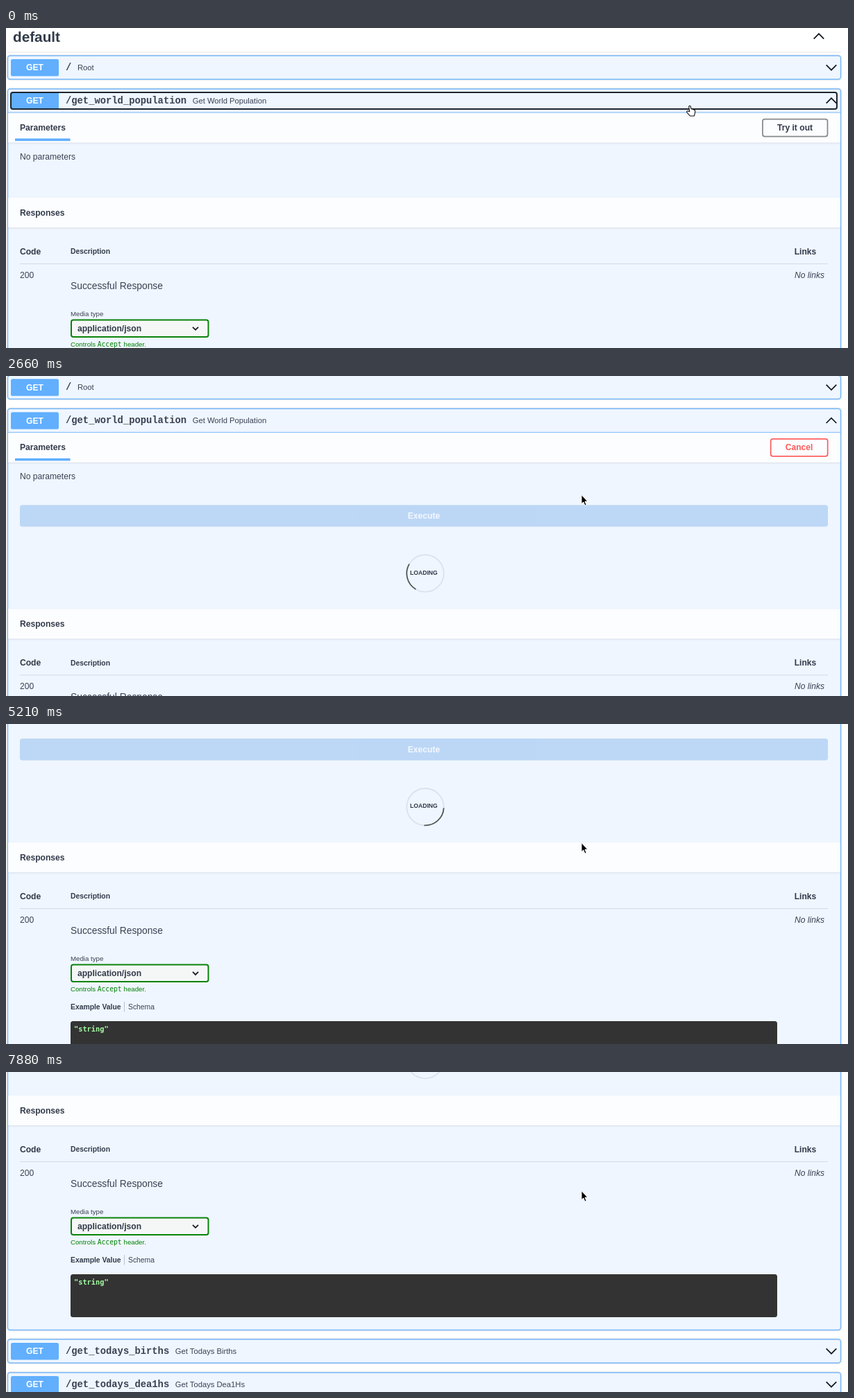
Recreate the animation shown at these times as an HTML page. Size 1213 px wide and 462 px high, loop 8000 ms.

```html
<!DOCTYPE html>
<html lang="en">
<head>
<meta charset="utf-8">
<title>API docs</title>
<style>
html, body { margin: 0; width: 100%; height: 100%; overflow: hidden; background: #fff; }
svg { display: block; }
text { font-family: "Liberation Sans", Arial, sans-serif; font-size: 12.1px; fill: #3b4151; white-space: pre; }
.b { font-weight: 700; fill: #323a49; }
.i { font-style: italic; }
.code { font: 700 13.82px "Liberation Mono", "Courier New", monospace; }
.mono { font-family: "DejaVu Sans Mono", monospace; }
.block { fill: #eff6ff; stroke: #79b9fb; stroke-width: 1.4; filter: drop-shadow(0 0 1.3px rgba(0,0,0,.19)); }
.strip { fill: #fcfdff; filter: drop-shadow(0 1px 1px rgba(0,0,0,.1)); }
.chev { fill: none; stroke: #14181f; stroke-width: 1.7; }
.btn { fill: #fcfdff; stroke-width: 1.75; }
.hover { filter: drop-shadow(0 0 2.5px rgba(0,0,0,.3)); }
</style>
</head>
<body>
<svg id="stage" width="1213" height="462" viewBox="0 0 1213 462"></svg>
<script>
const LOOP = 8000, STEP = 148.6, LAG = 13;

// Page builders
const text = (x, y, s, cls = '', size = 12.1, fill = '') =>
  `<text x="${x}" y="${y}" class="${cls}" style="font-size:${size}px${fill && ';fill:' + fill}">${s}</text>`;
const rect = (x, y, w, h, r, attrs) =>
  `<rect x="${x}" y="${y}" width="${w}" height="${h}" rx="${r}" ${attrs}/>`;
const chevron = (x, y, dir, w = 7.3, h = 3.7, sw = 1.7) =>
  `<path class="chev" style="stroke-width:${sw}" d="M${x - w} ${y - h * dir}L${x} ${y + h * dir}L${x + w} ${y - h * dir}"/>`;
const line = (x1, x2, y, color) =>
  `<path d="M${x1} ${y}H${x2}" stroke="${color}" stroke-width="1"/>`;
const strip = (y, label) =>
  rect(3, y, 1199, 43, 0, 'class="strip"') + text(20, y + 25.6, label, 'b');

function summary(y, path, label, dir) {
  const labelX = 86 + path.length * 8.29 + 8.6;
  return rect(7, y - 12, 69, 24.5, 2.6, 'fill="#61affe"') +
    text(29, y + 4.3, 'GET', 'b', 12.1, '#fff') +
    text(86, y + 4, path, 'code', 13.82) +
    text(labelX, y + 4, label, '', 11.23) +
    chevron(1189, y, dir);
}
const closedRow = (y, path, label) =>
  rect(2.5, y - 17, 1200, 34, 3.5, 'class="block"') + summary(y, path, label, 1);

const head =
  text(10, 20, 'default', 'b', 20.74) + chevron(1171, 12, -1) +
  line(2, 1203, 35, '#e2e4e8') +
  closedRow(57, '/', 'Root');

const operation =
  rect(2.5, 88, 1200, 495.5, 3.5, 'id="block" class="block"') +
  strip(122.5, 'Parameters') +
  line(3, 1202, 122, '#79b9fb') +
  summary(105, '/get_world_population', 'Get World Population', -1) +
  rect(7, 93, 1190, 24, 3, 'id="focus" fill="none" stroke="#1c2530" stroke-width="2"') +
  rect(13, 159.5, 79.5, 3.6, 0, 'fill="#61affe"') +
  text(20, 189.7, 'No parameters') +
  '<g id="try">' + rect(1090, 131.5, 93.5, 25, 3, 'class="btn" stroke="#87898d"') +
  text(1111, 148, 'Try it out', 'b') + '</g>' +
  '<g id="cancel">' + rect(1101.7, 131.5, 82, 25, 3, 'class="btn" stroke="#ff6060"') +
  text(1122.7, 148, 'Cancel', 'b', 12.1, '#ff5a5a') + '</g>' +
  '<g id="execute">' + rect(20, 227, 1164, 31.3, 3.5, 'fill="#4990e2"') +
  text(578.8, 247, 'Execute', 'b', 12.1, '#fff') + '</g>' +
  `<g id="loading" fill="none" stroke-width="1.8">
    <circle cx="604" cy="325.6" r="26.7" stroke="rgba(85,85,85,.12)"/>
    <path id="arc" d="M-18.9 -18.9A26.7 26.7 0 0 1 18.9 -18.9" stroke="rgba(0,0,0,.62)"/>` +
  text(582, 327.4, 'LOADING', 'b', 8.64) + '</g>';

const lower =
  strip(245, 'Responses') +
  text(20, 327, 'Code', 'b') + text(93, 326.3, 'Description', 'b', 10.37) +
  text(1135.7, 327, 'Links', 'b') + line(20, 1184, 340.5, '#d3dae5') +
  text(20, 361, '200') + text(93, 376.5, 'Successful Response', '', 13.83) +
  text(1136, 361, 'No links', 'i') +
  text(93, 416, 'Media type', '', 9.68) +
  rect(94, 421.5, 197.5, 24.5, 3, 'fill="#f5f7f6" stroke="#0a830a" stroke-width="2"') +
  text(103, 437.7, 'application/json', 'b') + chevron(273, 433.8, 1, 4, 2, 1.8) +
  text(93, 459.5, 'Controls', '', 9.68, '#008000') +
  text(131.7, 459.5, 'Accept', 'mono', 9.68, '#008000') +
  text(169.5, 459.5, 'header.', '', 9.68, '#008000') +
  text(93, 486, 'Example Value', 'b', 10.37) +
  '<path d="M170.5 475V489.5" stroke="#bcc2cc"/>' +
  text(176, 486, 'Schema', '', 10.37) +
  rect(93, 503, 1018, 62, 3.5, 'fill="#333"') +
  text(98, 518.3, '"string"', 'b mono', 10.3, '#a2fca2') +
  closedRow(614, '/get_todays_births', 'Get Todays Births') +
  closedRow(662, '/get_todays_dea1hs', 'Get Todays Dea1Hs');

const cursors =
  `<g id="cursor" stroke-linejoin="round">
    <path id="hand" fill="#fff" stroke="#111" stroke-width="1.1"
      d="M-1.3 1.4Q-.4 -.6 1.1 1L2.2 5Q3.6 4.2 4.3 5.5Q5.8 5 6.2 6.4Q7.8 6.2 7.8 8L7.4 11.4L6.3 15H.4L-4 9.8Q-5 7.8 -2.9 7.7L-.2 8.8Z"/>
    <path id="arrow" fill="#000" stroke="#fff" stroke-width="1"
      d="M0 0V13L2.9 10.4L5 15.6L7.2 14.7L5.1 9.6H9Z"/>
    <g id="ban" fill="#eef0f2" stroke="#85898e" stroke-width="1.5">
      <circle cx="8.7" cy="19.5" r="7.6" fill="#fff" stroke="none"/>
      <circle cx="8.7" cy="19.5" r="6.3"/><path d="M4.3 15.1L13.1 23.9"/>
    </g>
  </g>`;

document.getElementById('stage').innerHTML =
  `<g id="page">${head}${operation}<g id="lower">${lower}</g></g>${cursors}`;

const el = {};
document.querySelectorAll('[id]').forEach(n => el[n.id] = n);

// Keys are [step, ...values]
const scrollKeys = [[14, 0], [22, 108.5], [29, 171], [40, 235], [45, 264], [53, 343]];
const cursorKeys = [
  [0, 985, 112, 'hand'], [1, 1022, 129, 'arrow'], [2, 1078, 150, 'arrow'],
  [3, 1116, 153, 'hand'], [4, 1128, 147, 'hand'], [6, 1128, 147, 'hand'],
  [7, 1110, 156, 'arrow'], [8, 1040, 184, 'arrow'], [9, 945, 218, 'arrow'],
  [10, 880, 237, 'hand'], [11, 847, 244, 'hand'], [12, 843.5, 244.5, 'hand'],
  [13, 843.5, 244.5, 'ban'], [14, 837, 212, 'arrow'], [15, 831, 181, 'arrow'],
  [16, 829, 171.5, 'arrow']
];

function at(keys, k) {
  let i = keys.length - 1;
  while (i > 0 && keys[i][0] > k) i--;
  const a = keys[i], b = keys[i + 1];
  if (!b || k <= a[0]) return a;
  const p = (k - a[0]) / (b[0] - a[0]);
  return a.map((v, j) => typeof v === 'number' ? v + (b[j] - v) * p : v);
}
const show = (node, on) => node.style.display = on ? '' : 'none';
const move = (node, x, y, deg = 0) =>
  node.setAttribute('transform', `translate(${x} ${y}) rotate(${deg})`);

function draw(k) {
  const open = k >= 6, busy = k >= 13;
  const shift = busy ? 132 : open ? 31 : 0;
  show(el.focus, !open);
  show(el.try, !open);
  show(el.cancel, open);
  show(el.execute, open);
  show(el.loading, busy);
  el.execute.style.opacity = k < 13 ? 1 : k < 14 ? .58 : .3;
  el.try.firstChild.classList.toggle('hover', k >= 3);
  el.cancel.firstChild.classList.toggle('hover', k === 6);
  el.execute.firstChild.classList.toggle('hover', k >= 10 && k <= 13);
  el.block.setAttribute('height', 495.5 + shift);
  move(el.lower, 0, shift);
  move(el.page, 0, -at(scrollKeys, k)[1]);
  move(el.arc, 604, 325.6, .36 * STEP * k + 66);

  const [, x, y, kind] = at(cursorKeys, k);
  move(el.cursor, x, y);
  show(el.hand, kind === 'hand');
  show(el.arrow, kind !== 'hand');
  show(el.ban, kind === 'ban');
}

const start = performance.now();
function tick(now) {
  const t = Math.max(0, now - start) % LOOP;
  draw(Math.min(53, Math.floor((t + LAG) / STEP)));
  requestAnimationFrame(tick);
}
draw(0);
requestAnimationFrame(tick);
</script>
</body>
</html>
```
